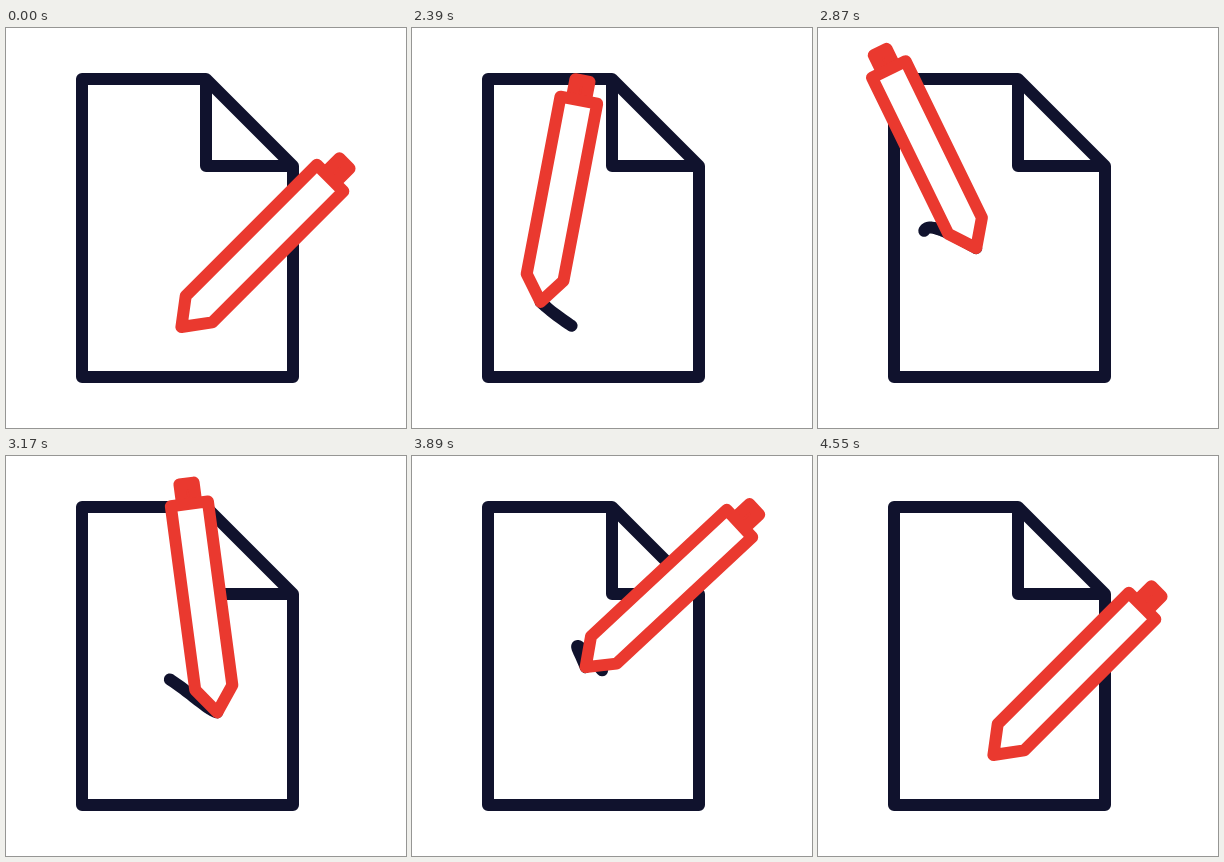
An HTML page that plays this animation: 400x400 px, repeating every 4580 ms.

```html
<!DOCTYPE html>
<html lang="en">
<head>
<meta charset="utf-8">
<title>Pen signing a document</title>
<style>
  html, body { margin: 0; width: 100%; height: 100%; overflow: hidden; background: #fff; }
  svg { display: block; width: 100%; height: 100%; }
  path { fill: none; stroke: #10122d; stroke-width: 12; stroke-linecap: round; stroke-linejoin: round; }
  #body { fill: #fff; stroke: #ea392f; }
  #cap { fill: #ea392f; stroke: #ea392f; }
</style>
</head>
<body>
<svg viewBox="0 0 400 400">
  <path d="M200 51H76V349H287V138L200 51V138H287"/>
  <path id="ink"/>
  <path id="cap"/>
  <path id="body"/>
</svg>
<script>
const LOOP = 4580, START = 2030, END = 4550, INK_START = 2275, INK_LENGTH = 58;

// The pen tip passes these points at equal intervals from START to END
const route = [
  [176.3, 298.3], [166, 302], [116.5, 259.5], [107.5, 201], [158, 220], [204, 253], [212, 252],
  [198, 224], [166, 190], [175.5, 216.7], [189, 270], [184, 293], [175.4, 299]
];

const clamp = (v, lo, hi) => Math.min(hi, Math.max(lo, v));
const progress = (t, from, to) => clamp((t - from) / (to - from), 0, 1);
const ease = p => p * p * (3 - 2 * p);

// Catmull-Rom curve through the route
function tip(t) {
  const last = route.length - 1;
  const place = progress(t, START, END) * last;
  const i = Math.min(Math.floor(place), last - 1), p = place - i;
  const [a, b, c, d] = [i - 1, i, i + 1, i + 2].map(k => route[clamp(k, 0, last)]);
  return [0, 1].map(n => b[n] + p / 2 * (c[n] - a[n]
    + p * (2 * a[n] - 5 * b[n] + 4 * c[n] - d[n] + p * (3 * (b[n] - c[n]) + d[n] - a[n]))));
}

// Swing left, swing right, settle
const tilt = t => 45
  - 71 * ease(progress(t, START, 2770))
  + 73 * ease(progress(t, 2870, 3787))
  - 2 * ease(progress(t, 4100, END));

// The pen is foreshortened while it leans left
const stretch = t => 1 - 0.13 * Math.exp(-(((t - 2670) / 216) ** 2));

const toPath = points => "M" + points.map(p => p.map(v => v.toFixed(2)).join(" ")).join("L");
const set = (id, name, value) => document.getElementById(id).setAttribute(name, value);

function drawPen(t) {
  const [x, y] = tip(t), angle = tilt(t) * Math.PI / 180;
  const sin = Math.sin(angle), cos = Math.cos(angle);
  // along the pen from its tip, then across it
  const at = ([u, v]) => [x + u * sin + v * cos, y - u * cos + v * sin];
  const top = 210.5 * stretch(t), end = 231 * stretch(t);
  set("body", "d", toPath([[0, 0], [25, -18.9], [top, -18.9], [top, 18.5], [25, 18.5]].map(at)) + "Z");
  set("cap", "d", toPath([[top, -7.5], [end, -7.5], [end, 6.8], [top, 6.8]].map(at)) + "Z");
}

// The stroke runs back from the tip, so one dash shows only its newest part
function drawInk(t) {
  const points = [];
  if (t > INK_START && t < END - 10) {
    for (let s = t; s > INK_START; s -= 10) points.push(tip(s));
    points.push(tip(INK_START));
  }
  set("ink", "d", points.length ? toPath(points) : "");
  set("ink", "stroke-dasharray", `${INK_LENGTH * (1 - progress(t, 4160, END))} 2000`);
}

function draw(t) {
  const moment = t < START ? END : t;
  drawPen(moment);
  drawInk(moment);
}

const begin = performance.now();
function tick() {
  draw((performance.now() - begin) % LOOP);
  requestAnimationFrame(tick);
}
tick();
</script>
</body>
</html>
```
